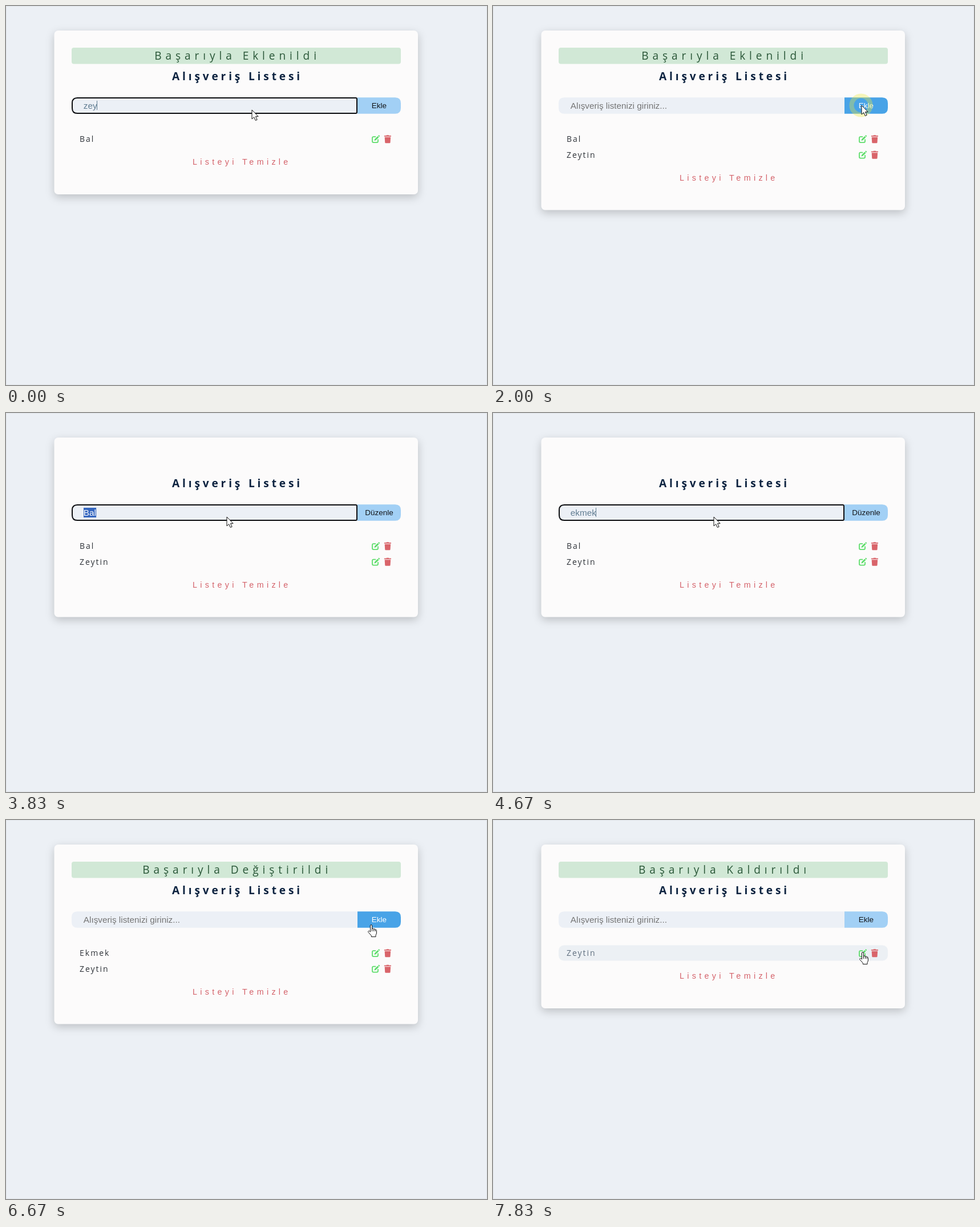
An HTML page that plays this animation: 843 px wide and 664 px high, repeating every 8000 ms.

```html
<!DOCTYPE html>
<html lang="tr">
<head>
<meta charset="utf-8">
<title>Alışveriş Listesi</title>
<style>
html, body { margin: 0; height: 100%; overflow: hidden; background: #ecf0f5; }
svg { display: block; width: 843px; height: 664px; }
text { font-family: "Liberation Sans", Arial, sans-serif; white-space: pre; }
.open { font-family: "Open Sans", sans-serif; }
.card { fill: #fcfbfb; filter: drop-shadow(0 5px 7.5px rgba(0, 0, 0, .2)); }
.alert { font-size: 19.12px; letter-spacing: 6.9px; fill: #2a5738; }
.title { font-size: 19.12px; font-weight: 700; letter-spacing: 4.85px; fill: #0d2340; }
.item { font-size: 14px; letter-spacing: 2px; }
.clear { font-size: 14.3px; letter-spacing: 5.33px; fill: #d4626a; }
.field { font-size: 15.3px; }
.button { font-size: 13.5px; text-anchor: middle; }
</style>
</head>
<body>
<svg id="stage" viewBox="0 0 843 664"></svg>
<script>
const stage = document.getElementById('stage');
const pen = document.createElement('canvas').getContext('2d');
const TICKS = 48, TICK = 1000 / 6;

// Pointer stops: [tick, x, y]
const stops = [
  [0, 431, 182], [6, 431, 182], [10, 646, 174], [13, 646, 174], [17, 647, 232],
  [20, 647, 232], [23, 387, 182], [30, 387, 182], [34, 640, 172], [36, 640, 172],
  [39, 640, 183], [40, 640, 183], [43, 668, 232], [45, 668, 232], [47, 648, 231]
];
const clicks = [11, 18, 36, 44];

// Each list holds [first tick, value]
const typed = [
  [0, 'zey'], [2, 'zeyt'], [4, 'zeyti'], [5, 'zeytin'], [11, ''], [18, 'Bal'],
  [25, 'e'], [26, 'ek'], [27, 'ekm'], [28, 'ekmek'], [36, '']
];
const alerts = [
  [0, 'Başarıyla Eklenildi', 260.2], [3, ''], [11, 'Başarıyla Eklenildi', 260.2], [23, ''],
  [36, 'Başarıyla Değiştirildi', 239.3], [45, 'Başarıyla Kaldırıldı', 254.9]
];
const lists = [[0, ['Bal']], [11, ['Bal', 'Zeytin']], [36, ['Ekmek', 'Zeytin']], [45, ['Zeytin']]];

const current = (list, k) => list.filter(e => e[0] <= k).pop();
const between = (v, a, b) => v >= a && v < b;
const mix = (a, b, p) => `rgb(${a.map((v, i) => Math.round(v + (b[i] - v) * p))})`;

function pointer(k) {
  const i = stops.findIndex(s => s[0] >= k);
  if (i < 1) return stops[0].slice(1);
  const [t0, x0, y0] = stops[i - 1], [t1, x1, y1] = stops[i];
  const u = (k - t0) / (t1 - t0), p = u * u * (3 - 2 * u);
  return [x0 + (x1 - x0) * p, y0 + (y1 - y0) * p];
}

function onButton(k) {
  const [x, y] = pointer(Math.max(k, 0));
  return between(x, 616, 692) && between(y, 160, 189);
}

const rect = (x, y, w, h, r, fill) =>
  `<rect x="${x}" y="${y}" width="${w}" height="${h}" rx="${r}" fill="${fill}"/>`;
const text = (cls, x, y, s, fill) =>
  `<text class="${cls}" x="${x}" y="${y}"${fill ? ` fill="${fill}"` : ''}>${s}</text>`;

const editIcon = y => `<g transform="translate(641 ${y})" fill="#5edd6b">
  <path d="M6.5 2.9H3Q1 2.9 1 4.9v6q0 2 2 2h6q2 0 2-2V8" fill="none" stroke="#5edd6b" stroke-width="1.8" stroke-linecap="round"/>
  <path d="M4.4 9.7l.7-2.6 5.4-5.4 2 2-5.4 5.4zM11.1 1.1l.8-.7q.6-.5 1.2 0l.7.7q.5.6 0 1.2l-.7.8z"/></g>`;
const trashIcon = y => `<path transform="translate(662.8 ${y}) scale(.0272)" fill="#d9646a"
  d="M432 32H312L303 13Q296 0 281 0H167Q152 0 145 13L136 32H16Q0 32 0 48V80Q0 96 16 96H432Q448 96 448 80V48Q448 32 432 32zM53 467Q57 512 101 512H347Q391 512 395 467L416 128H32z"/>`;

const arrow = 'M0 0V16l3.7-3.4 2.6 5.9 2.8-1.2-2.6-5.7h4.6z';
const hand = 'M-1.5 13V2.1Q-1.5.6 0 .6T1.5 2.1V8.2Q1.7 7 3 7T4.6 8.8Q4.9 7.7 6 7.8T7.3 9.6Q7.6 8.8 8.4 9T9.4 10.6V15Q9.4 17 8 18.6V21.6H.3V19.6L-5.1 13.4Q-5.8 12.2-4.7 11.5T-2.7 12z';

function field(k) {
  const value = current(typed, k)[1];
  const focus = k < 11 || between(k, 22, 36), selected = between(k, 23, 25);
  pen.font = '15.3px "Liberation Sans", Arial, sans-serif';
  const width = pen.measureText(value).width;
  let out = '<path d="M125 160.3H616V188.7H125Q115 188.7 115 178.7V170.3Q115 160.3 125 160.3z" fill="#ecf0f6"/>';
  if (selected) out += rect(136, 166, width, 17, 0, '#3566bf');
  out += value
    ? text('field', 135.8, 179.5, value, selected ? '#fff' : '#617d92')
    : text('field', 135.8, 179.5, 'Alışveriş listenizi giriniz...', '#757575');
  if (focus) {
    if (!selected) out += rect(Math.round(135.3 + width * .99), 166, 1, 16, 0, '#617d92');
    out += '<path d="M125 161H613Q615 161 615 163V186Q615 188 613 188H125Q116 188 116 179V170Q116 161 125 161z" fill="none" stroke="#0c0d10" stroke-width="2"/>';
  }
  return out;
}

function button(k) {
  const h = !onButton(k) ? 0 : onButton(k - 2) ? 1 : onButton(k - 1) ? .88 : .5;
  return `<path d="M616 160.3H682Q692 160.3 692 170.3V178.7Q692 188.7 682 188.7H616z" fill="${mix([162, 208, 245], [72, 163, 231], h)}"/>` +
    text('button', 654, 179.2, between(k, 18, 36) ? 'Düzenle' : 'Ekle', mix([20, 22, 26], [255, 255, 255], h));
}

function row(name, i, x, y) {
  const top = 219.5 + i * 27.5;
  const hover = between(y, top, top + 27.5) && between(x, 115, 692);
  return (hover ? rect(115, top, 577, 27, 9, '#ecf0f4') : '') +
    text('open item', 129, top + 18.5, name, hover ? '#617080' : '#30343a') +
    editIcon(top + 6.7) + trashIcon(top + 6.7);
}

function ring(k) {
  const start = clicks.find(c => between(k, c, c + 3));
  if (start === undefined) return '';
  const age = k - start, [x, y] = pointer(k);
  return `<circle cx="${x - 1}" cy="${y}" r="${[10, 16.5, 20][age]}" fill="none" stroke="#ece83c" stroke-width="8" opacity="${[.5, .35, .12][age]}"/>`;
}

function draw(k) {
  const items = current(lists, k)[1], drop = (items.length - 1) * 27.5;
  const [, message, left] = current(alerts, k);
  const [x, y] = pointer(k);
  const isHand = between(k, 14, 21) || k >= 34;
  stage.innerHTML =
    '<path d="M.5 .5H842.5V663.5H.5z" fill="#ecf0f5" stroke="#e2e5ea"/>' +
    `<rect class="card" x="84.5" y="43" width="637.5" height="${287 + drop}" rx="7"/>` +
    (message ? rect(115, 73, 577, 28.4, 4, '#d1e8d6') + text('open alert', left, 94, message) : '') +
    text('open title', 291, 130, 'Alışveriş Listesi') +
    field(k) + button(k) +
    items.map((name, i) => row(name, i, x, y)).join('') +
    text('clear', 327, 278 + drop, 'Listeyi Temizle') +
    ring(k) +
    `<path transform="translate(${x} ${y})" d="${isHand ? hand : arrow}" fill="#fff" stroke="#111" stroke-linejoin="round"/>` +
    (isHand ? `<path transform="translate(${x} ${y})" d="M1.5 8v4M4.6 8.8V12M7.3 9.6V12" stroke="#111"/>` : '');
}

let shown = -1;
function loop() {
  const k = Math.floor((performance.now() + 4) / TICK) % TICKS;
  if (k !== shown) draw(shown = k);
  requestAnimationFrame(loop);
}
loop();
</script>
</body>
</html>
```
